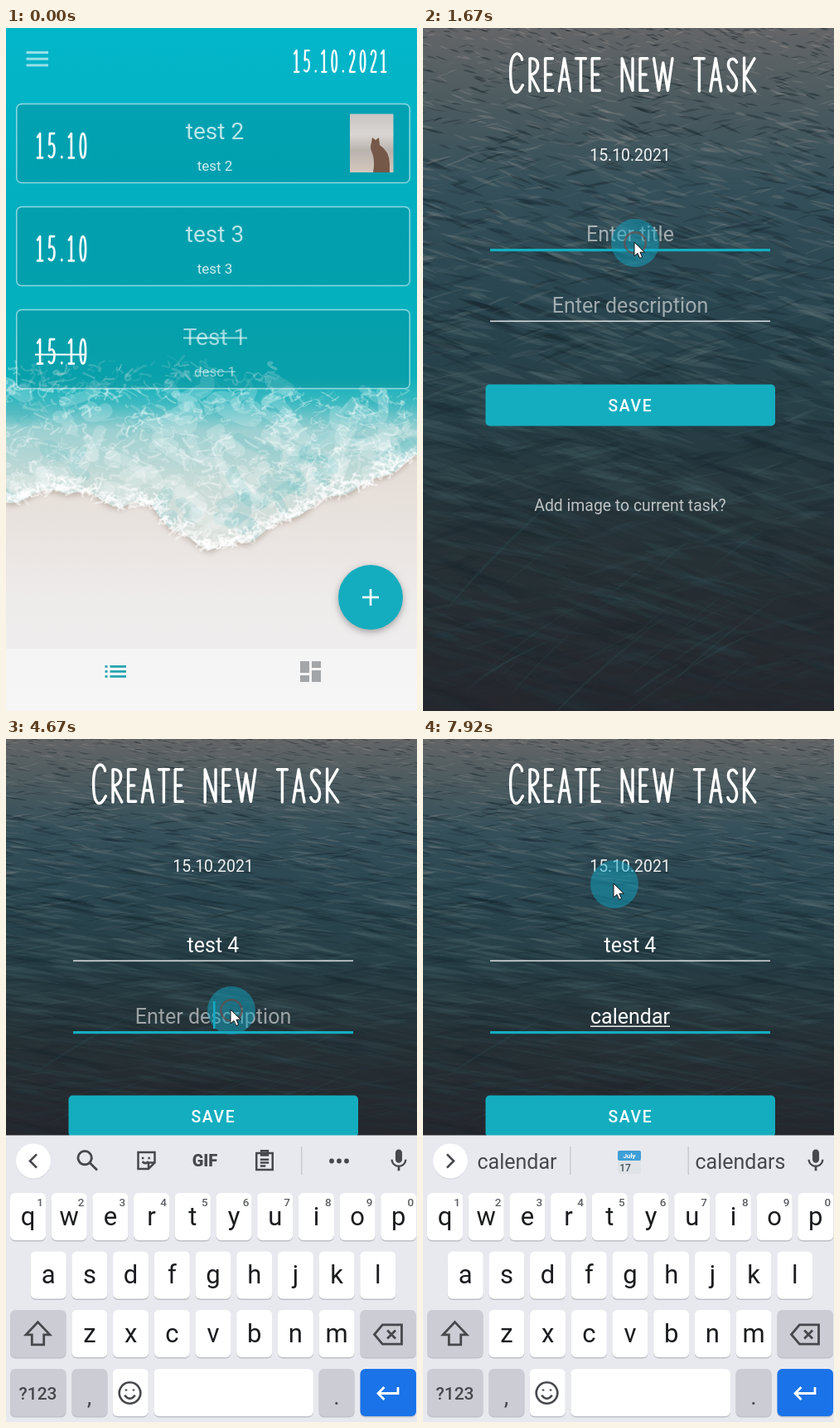
An HTML page with a canvas for the animation above (8 s loop, 496 px wide and 823 px high).

```html
<!DOCTYPE html>
<html lang="en">
<head>
<meta charset="utf-8">
<title>Create new task</title>
<style>
html, body { margin: 0; width: 100%; height: 100%; overflow: hidden; background: #24262e }
canvas { display: block }
</style>
</head>
<body>
<canvas id="stage" width="496" height="823"></canvas>
<script>
const W = 496, H = 823, LOOP = 8000, TEAL = '#14adbf', INK = '#46484c';
const stage = document.getElementById('stage').getContext('2d');

// ---------- helpers ----------
let seed = 7;
const rnd = () => (seed = (seed * 16807) % 2147483647) / 2147483647;
const clamp = v => Math.max(0, Math.min(1, v));
const ease = v => v * v * (3 - 2 * v);
const phase = (t, a, b) => clamp((t - a) / (b - a));
const white = a => `rgba(255,255,255,${a})`;

function layer(draw) {
  const c = document.createElement('canvas');
  c.width = W; c.height = H;
  const g = c.getContext('2d');
  if (draw) draw(g);
  return g;
}
function gradient(g, y0, y1, stops) {
  const gr = g.createLinearGradient(0, y0, 0, y1);
  stops.forEach(([y, c]) => gr.addColorStop((y - y0) / (y1 - y0), c));
  return gr;
}
function box(g, x, y, w, h, r, fill) {
  g.fillStyle = fill;
  g.beginPath();
  g.roundRect(x, y, w, h, r);
  g.fill();
}
function disc(g, x, y, r, fill) {
  g.fillStyle = fill;
  g.beginPath();
  g.arc(x, y, r, 0, 7);
  g.fill();
}
function text(g, s, x, y, size, fill, align = 'center', weight = 400) {
  g.font = `${weight} ${size}px Roboto, sans-serif`;
  g.textAlign = align;
  g.fillStyle = fill;
  g.fillText(s, x, y);
  return g.measureText(s).width;
}
// Path on a 24-unit grid centred on x, y; stroked when a line width is given.
function icon(g, d, x, y, scale, color, line) {
  g.save();
  g.translate(x - 12 * scale, y - 12 * scale);
  g.scale(scale, scale);
  g.fillStyle = g.strokeStyle = color;
  g.lineWidth = line / scale;
  const p = new Path2D(d);
  line ? g.stroke(p) : g.fill(p);
  g.restore();
}

// ---------- narrow hand lettering: [width, strokes], ten units high ----------
const GLYPHS = {
  C: [4.3, 'M3.9 .6C3.4-2.2 .4-2.4 .4 4.4S2.4 11.8 4.1 8.2'],
  R: [3, 'M.3 10V.2C3.6-.4 3.4 5 .4 5L3 10'],
  E: [2.6, 'M2.5 .2H.3V9.8H2.6M.3 5H2.1'],
  A: [3.6, 'M.2 10L1.8 .2 3.5 10M.8 6.5H3'],
  T: [3, 'M0 .2H3M1.5 .2V10'],
  N: [3.8, 'M.3 10V.2L3.5 9.8V.2'],
  W: [6, 'M.2 .2L1.7 9.8 3 1.5 4.4 9.8 5.8 .2'],
  S: [3.2, 'M2.9 1.3C1.8-.6 .2 .6 .4 2.4S3 5 2.9 7.6 1 10.6 .2 8.6'],
  K: [3.7, 'M.3 0V10M3.4 .2L.4 5.4 3.6 10'],
  1: [2, 'M0 1.6L1 .2V9.8M0 9.8H2'],
  5: [2.4, 'M2.2 .2H.5L.3 4.6C1.7 3.4 2.4 5 2.3 7S1.2 10.6 .1 9'],
  0: [2.4, 'M1.2 .2C-.2 .2-.2 9.8 1.2 9.8S2.6 .2 1.2 .2Z'],
  2: [2.4, 'M.2 2C.4-.6 2.4-.4 2.2 2.6 2 5 .2 8.6 .2 9.8H2.4'],
  '.': [.8, 'M.4 9.4V9.7'],
  ' ': [3.1, '']
};
function lettering(g, s, x, y, unit, gap, color) {
  g.save();
  g.translate(x, y);
  g.scale(unit, unit);
  g.strokeStyle = color;
  g.lineWidth = .85;
  g.lineCap = g.lineJoin = 'round';
  for (const ch of s.toUpperCase()) {
    const [w, d] = GLYPHS[ch];
    g.stroke(new Path2D(d));
    g.translate(w + gap, 0);
  }
  g.restore();
}

// ---------- backdrops ----------
const SHORE = [[0, 572], [60, 556], [100, 562], [140, 577], [175, 572], [200, 606], [245, 627],
  [290, 619], [340, 592], [390, 566], [440, 548], [496, 516]];
function shoreAt(x) {
  const i = Math.max(1, SHORE.findIndex(p => p[0] >= x));
  const [x0, y0] = SHORE[i - 1], [x1, y1] = SHORE[i];
  return y0 + (y1 - y0) * (x - x0) / (x1 - x0);
}
function curl(g, x, y, size, color, line) {
  g.strokeStyle = color;
  g.lineWidth = line;
  g.beginPath();
  g.moveTo(x, y);
  const j = () => (rnd() - .5) * size;
  g.bezierCurveTo(x + j(), y + j(), x + j() * 2, y + j(), x + j() * 2, y + j() * 1.5);
  g.stroke();
}
function shoreline(g) {
  g.beginPath();
  g.moveTo(0, 0);
  for (let x = 0; x <= W; x += 4) g.lineTo(x, shoreAt(x) + 3 * Math.sin(x / 9));
  g.lineTo(W, 0);
}
function beach(g) {
  g.lineCap = 'round';
  g.fillStyle = gradient(g, 500, H, [[500, '#e2dad3'], [600, '#e9e3df'], [690, '#eeebeb'], [H, '#f0eff0']]);
  g.fillRect(0, 0, W, H);
  g.fillStyle = gradient(g, 0, 630, [[0, '#04b6ca'], [200, '#02afc1'], [330, '#04b0be'], [420, '#0cb0ba'],
    [452, '#3cb9c0'], [485, '#9dd0d1'], [545, '#c6dbd7'], [630, '#e0e2de']]);
  shoreline(g);
  g.save();
  g.shadowColor = 'rgba(120,100,85,.4)';
  g.shadowBlur = 7;
  g.shadowOffsetY = 3;
  g.fill();
  g.restore();

  g.save();
  g.clip();
  for (let i = 0; i < 110; i++) {
    const x = rnd() * W, top = x < 330 ? 425 : 452;
    const y = top + (shoreAt(x) - top) * rnd();
    curl(g, x, y, 40, i % 3 ? white(.2) : 'rgba(70,180,186,.16)', 8 + rnd() * 10);
  }
  g.restore();
  for (let i = 0; i < 900; i++) {
    const x = rnd() * W, top = x < 330 ? 402 : 440;
    const y = top + (shoreAt(x) - top) * rnd();
    curl(g, x, y, 15, white(.1 + rnd() * .28), .8 + rnd() * 2.4);
  }
  for (let i = 0; i < 380; i++) {
    const x = rnd() * W;
    curl(g, x, shoreAt(x) - rnd() * rnd() * 22, 10, white(.5), 2.5);
  }
}

// One leaf-shaped facet of water.
function facet(g, x, y, len, lift, tilt, color) {
  const dx = len / 2, dy = dx * tilt;
  g.fillStyle = color;
  g.beginPath();
  g.moveTo(x - dx, y - dy);
  g.quadraticCurveTo(x, y - lift, x + dx, y + dy);
  g.quadraticCurveTo(x - dx * .3, y + lift * .5, x - dx, y - dy);
  g.fill();
}
function ocean(g) {
  g.fillStyle = gradient(g, 0, H, [[0, '#646567'], [80, '#4e5c60'], [190, '#35505a'], [320, '#2a4650'],
    [460, '#273f47'], [600, '#263338'], [720, '#262c31'], [H, '#25272d']]);
  g.fillRect(0, 0, W, H);
  for (let i = 0; i < 2600; i++) {
    const y = H * rnd() ** 1.5, near = y / H, x = rnd() * 560 - 32;
    const len = 10 + near * 130 * (.2 + rnd()), lift = 2 + near * 16 * rnd();
    const tilt = rnd() < .7 ? .15 + rnd() * .3 : -.1 - rnd() * .3;
    const a = (.55 - .5 * near) * (.3 + rnd() * .7);
    const light = `rgba(${158 - 120 * near},${148 - 55 * near},${146 - 45 * near},${a * .8})`;
    facet(g, x, y, len, lift, tilt, i % 2 ? light : `rgba(20,34,41,${a})`);
  }
  // slanting glints in the foreground
  for (let i = 0; i < 26; i++)
    facet(g, 60 + rnd() * 320, 620 + rnd() * 170, 60 + rnd() * 110, 9, -.5 - rnd() * .5, 'rgba(50,98,104,.16)');
}

// ---------- task list ----------
function card(g, y, title, desc, done) {
  box(g, 12.8, y, 474.4, 95, 6, 'rgba(0,122,132,.3)');
  g.strokeStyle = white(.55);
  g.lineWidth = 1.5;
  g.stroke();
  lettering(g, '15.10', 38, y + 35, 3.05, 2.4, '#fff');
  const strike = (x, w, dy, c, h) => { g.fillStyle = c; g.fillRect(x, y + dy, w, h); };
  text(g, title, 252, y + 42.5, 28, white(done ? .6 : .72));
  text(g, desc, 252, y + 80, 17, white(done ? .55 : .8));
  if (done) {
    strike(35, 62, 53, '#fff', 2);
    strike(214, 77, 33, white(.6), 2);
    strike(228, 49, 74, white(.55), 1.2);
  }
}
function list(g) {
  beach(g);
  g.fillStyle = white(.58);
  for (const y of [28, 35.7, 43.4]) g.fillRect(24.5, y, 26.5, 3);
  lettering(g, '15.10.2021', 348, 26.5, 2.68, 2.4, '#fff');
  card(g, 91.5, 'test 2', 'test 2');
  card(g, 215.5, 'test 3', 'test 3');
  card(g, 339.5, 'Test 1', 'desc 1', true);

  g.fillStyle = gradient(g, 104, 174, [[104, '#c9c5c3'], [128, '#dad6d2'], [148, '#b9b3ae'], [174, '#d4c8bd']]);
  g.fillRect(415, 103.5, 52.5, 70.5);
  g.fillStyle = '#765848';
  g.fill(new Path2D('M441 138l1-6 4 3 4-3 1 9q12 8 12 23v10h-20q3-15-2-26-2-4 0-10z'));

  g.save();
  g.shadowColor = 'rgba(0,0,0,.32)';
  g.shadowBlur = 8;
  g.shadowOffsetY = 3;
  disc(g, 440, 686, 39, TEAL);
  g.restore();
  g.fillStyle = '#fff';
  g.fillRect(430, 684.7, 20, 2.6);
  g.fillRect(438.7, 676, 2.6, 20);

  g.fillStyle = white(.4);
  g.fillRect(0, 748, W, 75);
  g.fillStyle = '#27a5b3';
  for (const y of [768, 774, 780]) {
    g.fillRect(119.5, y, 3, 2.8);
    g.fillRect(125.5, y, 19.5, 2.8);
  }
  g.fillStyle = '#a3a6a8';
  [[355, 763, 14], [355, 780, 8], [369, 763, 8], [369, 774, 14]].forEach(([x, y, h]) => g.fillRect(x, y, 11, h));
}

// ---------- keyboard ----------
const MIC = 'M12 14c1.66 0 3-1.34 3-3V5c0-1.66-1.34-3-3-3S9 3.34 9 5v6c0 1.66 1.34 3 3 3zM17.3 11c0 3-2.54 5.1-5.3 5.1S6.7 14 6.7 11H5c0 3.41 2.72 6.23 6 6.72V21h2v-3.28c3.28-.48 6-3.3 6-6.72z';
const GREY = '#cbccd4';
function key(g, x, y, w, fill = '#fff') {
  box(g, x, y + 1.5, w, 57, 6, '#bfc0c8');
  box(g, x, y, w, 57, 6, fill);
}
function keys(g) {
  g.fillStyle = '#e8e9ef';
  g.fillRect(0, 477.5, W, 346);
  disc(g, 33, 509.5, 21, '#d2d3da');
  disc(g, 33, 508.5, 21, '#fff');
  icon(g, MIC, 474, 508, 1.35, INK);
  [['qwertyuiop', 5, 547], ['asdfghjkl', 29.7, 617.5], ['zxcvbnm', 79.4, 688]].forEach(([row, x0, y], r) =>
    [...row].forEach((ch, i) => {
      const x = x0 + 49.7 * i;
      key(g, x, y, 43);
      text(g, ch, x + 21.5, y + 38.5, 31, '#1b1c1f');
      if (!r) text(g, (i + 1) % 10, x + 36, y + 15.5, 13.5, '#5c5e64', 'center', 500);
    }));
  key(g, 5, 688, 67.5, GREY);
  icon(g, 'M12 3L21 12.5H16.5V20H7.5V12.5H3Z', 38.5, 717, 1.6, INK, 2.8);
  key(g, 427.5, 688, 67.5, GREY);
  icon(g, 'M8 5H22V19H8L2 12ZM11.5 9l6 6m0-6l-6 6', 461, 717.5, 1.65, INK, 2.8);
  key(g, 5, 759, 67.5, GREY);
  text(g, '?123', 38.5, 796, 21, INK, 'center', 500);
  key(g, 79.4, 759, 43, GREY);
  text(g, ',', 100.5, 802, 28, INK);
  key(g, 128.7, 759, 43);
  icon(g, 'M12 3.5a8.5 8.5 0 1 0 .01 0M9 9v1.4M15 9v1.4M7.8 13.8q4.2 5.4 8.4 0', 149.5, 788, 1.5, INK, 2.6);
  key(g, 178.4, 759, 192.5);
  key(g, 377.5, 759, 43, GREY);
  text(g, '.', 399, 802, 28, INK);
  key(g, 427.5, 759, 67.5, '#1a73e8');
  icon(g, 'M20 7v5H4m5-5l-5 5 5 5', 461, 788.5, 1.5, '#fff', 2.8);
}
function calendarEmoji(g) {
  box(g, 235, 497, 28, 27, 2, '#dfe3e6');
  box(g, 235, 496, 28, 12, 2, '#3f9fd6');
  text(g, 'July', 249, 505, 8, '#fff', 'center', 700);
  text(g, '17', 244, 521, 12, '#44525c', 'center', 500);
}
function strip(g, words) {
  icon(g, words ? 'M9 6l6 6-6 6' : 'M15 6l-6 6 6 6', 33, 508.5, 1.35, INK, 2.6);
  const divider = x => { g.fillStyle = '#c9cad1'; g.fillRect(x, 491, 1.5, 34); };
  if (words) {
    divider(177);
    divider(319.5);
    words.forEach((w, i) => w === '*' ? calendarEmoji(g) : text(g, w, 113.5 + 134.7 * i, 518, 25, INK));
    return;
  }
  divider(356);
  icon(g, 'M9.5 3.5a6 6 0 1 0 .01 0M14 14l6.5 6.5', 98.5, 508, 1.35, INK, 2.8);
  icon(g, 'M4 4h16v10l-6 6H4zM20 14h-6v6M8.5 8.5v2M14.5 8.5v2M8 13q3 3 6 0', 169.5, 508, 1.25, INK, 2.5);
  text(g, 'GIF', 240, 515, 20, INK, 'center', 900);
  icon(g, 'M4.5 5h15v15.5h-15zM9 3h6v4H9zM8 11h8M8 14h8M8 17h5', 312, 508, 1.3, INK, 2.5);
  for (const x of [393, 402, 411]) disc(g, x, 508.5, 2.9, INK);
}

// ---------- new task form ----------
const TITLE_AT = [2830, 2920, 3000, 3170, 3580, 3900];
const DESC_AT = [5670, 5750, 5920, 6170, 6420, 6670, 6840, 7170];
const HINTS = [[0, ''], [2830, 't,to,the'], [2920, 'te,the,test'], [3000, 'tes,yes,test'],
  [3170, 'test,testing,tests'], [3580, 'is,results,and'], [3900, '4,4th,4 and'], [4600, ''],
  [5670, 'c,can,come'], [5750, 'ca,can,call'], [5920, 'cal,call,called'], [6170, 'cale,calendar,calendars'],
  [6420, 'calen,calendar,calendars'], [6670, 'calend,calendar,calendars'], [7250, 'calendar,*,calendars']];
const typed = (s, times, t) => s.slice(0, times.filter(at => at <= t).length);

function field(g, t, { y, hint, value, focus, from, times, composing }) {
  const w = value ? text(g, value, 250, y, 25, '#fff') : 0;
  if (!value) text(g, hint, 250, y, 25, white(.55));
  g.fillStyle = focus ? TEAL : white(.8);
  g.fillRect(81, y + (focus ? 9 : 9.5), 338, focus ? 3.2 : 1.6);
  if (value && composing) {
    g.fillStyle = white(.9);
    g.fillRect(250 - w / 2, y + 2.5, w, 1.5);
  }
  const last = Math.max(from, ...times.filter(at => at <= t));
  if (focus && t >= from && (t - last) % 1000 < 500) {
    g.fillStyle = TEAL;
    g.fillRect(250 + w / 2, y - 27, 2.6, 33);
  }
}
function form(g, t) {
  const up = ease(phase(t, 1750, 2050)), kb = 345.5 * (1 - up);
  g.drawImage(sea, 0, 0, W, H - 345.5 * up);
  lettering(g, 'Create new task', 104, 36, 4, 1.65, '#fff');
  text(g, '15.10.2021', 250, 160, 19.4, white(.92));
  const onDesc = t >= 4600;
  field(g, t, { y: 257, hint: 'Enter title', value: typed('test 4', TITLE_AT, t),
    focus: t >= 1600 && !onDesc, from: 2000, times: TITLE_AT, composing: t < 3580 });
  field(g, t, { y: 343, hint: 'Enter description', value: typed('calendar', DESC_AT, t),
    focus: onDesc, from: 4600, times: DESC_AT, composing: true });
  box(g, 75.5, 429.5, 349.5, 50, 5, TEAL);
  g.letterSpacing = '1.6px';
  text(g, 'SAVE', 223.5, 462, 19.4, '#fff', 'left', 500);
  g.letterSpacing = '0px';
  text(g, 'Add image to current task?', 250, 582, 19.4, white(.7));
  if (up) {
    g.save();
    g.translate(0, kb);
    g.drawImage(board, 0, 0);
    const words = HINTS.findLast(h => h[0] <= t)[1];
    strip(g, words && words.split(','));
    g.restore();
  }
}

// ---------- pointer ----------
const PATH = [[330, 457, 626], [750, 412, 668], [1170, 412, 668], [1600, 256, 258], [4250, 256, 258],
  [4600, 272, 326], [7350, 272, 326], [7850, 231, 174], [LOOP, 231, 174]];
const CLICKS = [800, 1600, 4600];
function pointer(g, t) {
  if (t < 80) return;
  const i = Math.max(1, PATH.findIndex(p => p[0] > t));
  const [t0, x0, y0] = PATH[i - 1], [t1, x1, y1] = PATH[i];
  const k = ease(phase(t, t0, t1)), x = x0 + (x1 - x0) * k, y = y0 + (y1 - y0) * k;
  disc(g, x, y + 1, 29, 'rgba(18,165,195,.5)');
  for (const c of CLICKS) {
    const p = (t - c) / 180;
    if (p < 0 || p > 1) continue;
    g.strokeStyle = `rgba(130,62,52,${.7 * (1 - p * .5)})`;
    g.lineWidth = 2.5;
    g.beginPath();
    g.arc(x, y + 1, 6 + 17 * p, 0, 7);
    g.stroke();
  }
  const arrow = new Path2D(`M${x - 1} ${y}v17l4-3.6 2.7 6.1 3-1.3-2.7-6h5.4z`);
  g.fillStyle = '#fff';
  g.strokeStyle = '#111';
  g.lineWidth = 1;
  g.fill(arrow);
  g.stroke(arrow);
}

// ---------- play ----------
const home = layer(list).canvas, sea = layer(ocean).canvas, board = layer(keys).canvas, page = layer();
function frame() {
  const t = performance.now() % LOOP, fade = phase(t, 880, 1180);
  if (fade < 1) stage.drawImage(home, 0, 0);
  if (fade) {
    stage.fillStyle = `rgba(0,0,0,${fade / 2})`;
    stage.fillRect(0, 0, W, H);
    form(page, t);
    stage.globalAlpha = fade;
    stage.drawImage(page.canvas, 0, 0);
    stage.globalAlpha = 1;
  }
  pointer(stage, t);
  requestAnimationFrame(frame);
}
frame();
</script>
</body>
</html>
```
